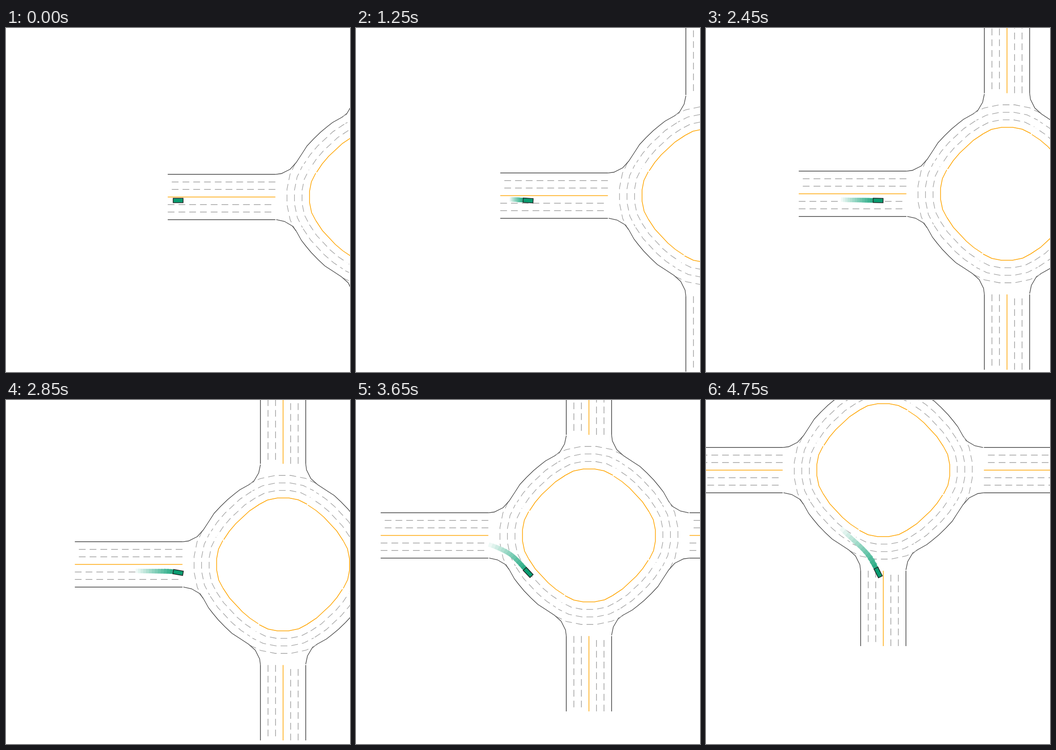
Write an HTML page that moves like this. It is 748 px wide and 748 px high and loops after 4.8 s.

```html
<!DOCTYPE html>
<html lang="en">
<head>
<meta charset="utf-8">
<title>Roundabout</title>
<style>
html, body { margin: 0; width: 100%; height: 100%; overflow: hidden; background: #fff; }
svg { display: block; width: 748px; height: 748px; }
path { fill: none; }
</style>
</head>
<body>
<svg viewBox="0 0 748 748">
  <g id="map"></g>
  <g id="trail"></g>
  <rect id="car" x="-10.8" y="-4.8" width="21.6" height="9.6" fill="#0a9c70" stroke="#222" stroke-width="1.5"/>
</svg>
<script>
const NS = "http://www.w3.org/2000/svg";
const LOOP = 4800, STEP = 50, GHOSTS = 13;
const LANE = 16.4, DASH = 14.6, PERIOD = 23.4;
const EDGE = "#404040", STRIPE = "#a0a0a0", CENTER = "#ffa500";
const CAR = [374.3, 375];

const map = document.getElementById("map");
const trail = document.getElementById("trail");
const car = document.getElementById("car");

function add(parent, tag, attrs) {
  const el = document.createElementNS(NS, tag);
  for (const k in attrs) el.setAttribute(k, attrs[k]);
  return parent.appendChild(el);
}

function line(parent, pts, color, width, dash, shift = 0) {
  const a = { d: "M" + pts.map(p => p.join(" ")).join("L"), stroke: color, "stroke-width": width };
  if (dash) {
    a["stroke-dasharray"] = DASH + " " + (PERIOD - DASH);
    a["stroke-dashoffset"] = shift;
  }
  return add(parent, "path", a);
}

// Parallel of a polyline on its right-hand side
function offset(pts, d) {
  return pts.map((p, i) => {
    const a = pts[Math.max(i - 1, 0)], b = pts[Math.min(i + 1, pts.length - 1)];
    const dx = b[0] - a[0], dy = b[1] - a[1], l = Math.hypot(dx, dy);
    return [p[0] - dy / l * d, p[1] + dx / l * d];
  });
}

const edge = [[-219, -49.2], [-205.5, -51], [-186.5, -60.5], [-173.5, -75], [-161, -94],
  [-150, -111], [-136, -126], [-120.5, -141], [-106, -153], [-94.5, -162],
  [-73, -174], [-63, -182], [-53, -199], [-49.2, -217]];
const gate = [[-131, -52], [-140.5, -33], [-144.5, -12.5], [-144.5, 12], [-140, 34], [-131, 51]];
const arc = [[-131, 51], [-116.5, 73], [-88.5, 103], [-72, 117], [-54, 129]];

// One quarter: approach road to the west, its crossing and the next arc
function quarter(angle, periods) {
  const g = add(map, "g", { transform: `rotate(${angle})` });
  const near = -218.8, far = near - periods * PERIOD;
  for (const lane of [1, 2]) {
    const y = lane * LANE;
    line(g, [[near, -y], [far, -y]], STRIPE, 1.5, true);
    line(g, [[far, y], [near, y]], STRIPE, 1.5, true);
    line(g, offset(arc, y), STRIPE, 1.3, true);
  }
  for (const y of [-3 * LANE, 3 * LANE]) line(g, [[far, y], [near, y]], EDGE, 1.5);
  line(g, [[far, 0], [near, 0]], CENTER, 1.5);
  for (const lane of [1, 2, 3]) {
    const p = line(g, offset(gate, lane * LANE), STRIPE, 1.3, true);
    const start = p.getTotalLength() / 2 + 2 - DASH / 2;
    p.setAttribute("stroke-dashoffset", -(start % PERIOD));
  }
  line(g, edge, EDGE, 1.3);
  line(g, gate, CENTER, 1.5);
  line(g, arc, CENTER, 1.5);
}
quarter(0, 10);
quarter(90, 7);
quarter(180, 10);
quarter(270, 7);

// Time, map x, map y, heading in degrees
const keys = [
  [100, 804.5, 367.4, 0], [650, 793.8, 366.6, 3], [1250, 766, 364.6, 3.5],
  [1750, 728.6, 362.1, 2.5], [1950, 710, 361.5, 1.8], [2300, 672.6, 360.9, 0.8],
  [2450, 654.6, 360.5, 1], [2850, 602, 357.8, 10], [3200, 554.6, 339.2, 31],
  [3400, 531.6, 322, 42], [3950, 475.7, 259, 48], [4150, 451.5, 234.5, 42],
  [4500, 407, 191, 47], [4750, 385, 152.3, 63]
];

function slope(i, c) {
  const a = keys[Math.max(i - 1, 0)], b = keys[Math.min(i + 1, keys.length - 1)];
  return (b[c] - a[c]) / (b[0] - a[0]);
}

function pose(t) {
  t = Math.min(Math.max(t, keys[0][0]), 4750);
  let i = 0;
  while (i < keys.length - 2 && t > keys[i + 1][0]) i++;
  const a = keys[i], b = keys[i + 1], h = b[0] - a[0], u = (t - a[0]) / h;
  const s = u * u * (3 - 2 * u);
  return [1, 2, 3].map(c => a[c] + (b[c] - a[c]) * s
    + h * u * (1 - u) * ((1 - u) * slope(i, c) - u * slope(i + 1, c)));
}

const ghosts = [];
for (let i = GHOSTS; i > 0; i--) {
  const k = 0.92 * (1 - i / (GHOSTS + 1));
  const rgb = [10, 160, 116].map(v => Math.round(255 + (v - 255) * k));
  ghosts[i] = add(trail, "rect", { x: -11, y: -4.8, width: 22, height: 9.6, fill: `rgb(${rgb})` });
}

function place(el, x, y, angle) {
  el.setAttribute("transform", `translate(${x} ${y}) rotate(${angle})`);
}

function draw(ms) {
  const t = Math.max(100, Math.floor(ms % LOOP / STEP) * STEP);
  const [x, y, heading] = pose(t);
  place(map, Math.floor(x) + 0.5, Math.floor(y) + 0.5, 0);
  place(car, CAR[0], CAR[1], heading);
  for (let i = 1; i <= GHOSTS; i++) {
    const past = t - i * STEP, shown = past >= 100;
    ghosts[i].setAttribute("visibility", shown ? "visible" : "hidden");
    if (!shown) continue;
    const [px, py, ph] = pose(past);
    place(ghosts[i], CAR[0] + x - px, CAR[1] + y - py, ph);
  }
}

let begin = null;
function tick(now) {
  if (begin === null) begin = now;
  draw(now - begin);
  requestAnimationFrame(tick);
}
draw(0);
requestAnimationFrame(tick);
</script>
</body>
</html>
```
